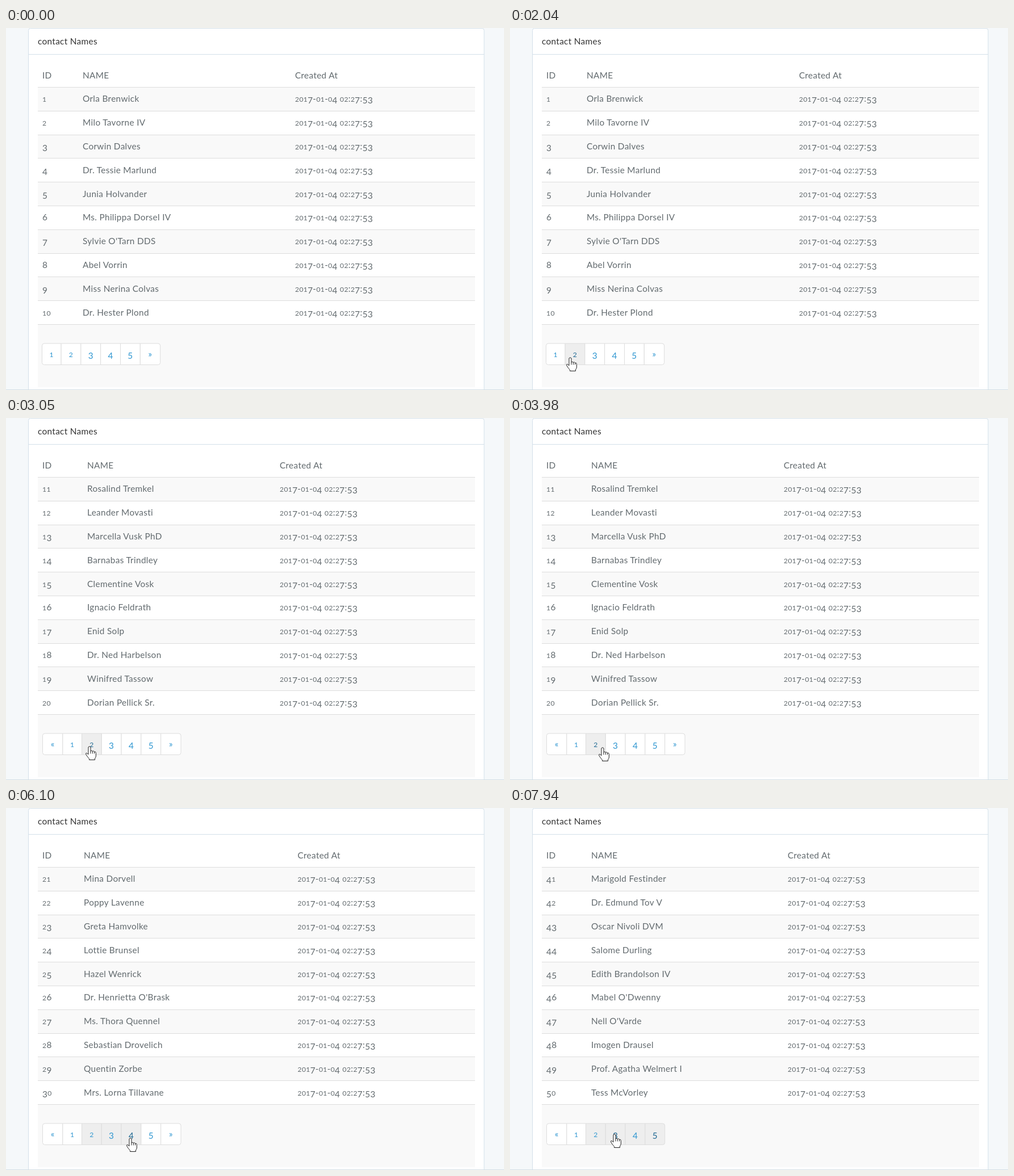
An HTML page for the animation above (8000 ms loop, 877 px wide and 638 px high).

```html
<!DOCTYPE html>
<html lang="en">
<head>
<meta charset="utf-8">
<title>Paged contact table</title>
<style>
  html, body { margin: 0; width: 100%; height: 100%; overflow: hidden; background: #f5f8fa; }
  svg { display: block; }
  text { font: 15.4px Lato, "Open Sans", sans-serif; letter-spacing: .3px; fill: #636b6f; white-space: pre; }
  .title { fill: #333; }
  .link text { fill: #3097d1; text-anchor: middle; }
  .link path { fill: #fff; stroke: #ddd; }
  .link.shaded path { fill: #eee; }
  .link.dark text { fill: #216a94; }
</style>
</head>
<body>
<svg id="stage" width="877" height="638" viewBox="0 0 877 638">
  <rect x="39.5" y=".5" width="802.5" height="660" rx="4" fill="#fff" stroke="#d3e0e9"/>
  <path d="M40 46.5H842" stroke="#d3e0e9"/>
  <text class="title" x="56" y="28.5">contact Names</text>
  <g id="pages"></g>
  <path d="M0 637.5H877" stroke="#d3dfe6"/>
  <g id="cursor" stroke="#222" stroke-linejoin="round" fill="#fff">
    <path id="arrow" d="M0 0V16.5L3.8 13L6.3 18.7L8.9 17.6L6.4 12H11.6Z"/>
    <path id="hand" d="M-2 1Q0-1.6 2 1V8Q4 6.400 5.400 8.300Q7.400 7 8.600 9.200Q11.400 8.500 11.400 11.500V17Q11 19.500 9.500 21V23.500H-.5V21.500Q-3 19-5.500 15Q-7.300 12.300-6 11.600Q-4.500 11-2 14ZM2 8V12.500M5.400 8.300V12.500M8.600 9.200V12.500"/>
  </g>
</svg>
<script>
const LOOP = 8000, CURSOR_START = 340, CURSOR_STEP = 77.5, ROW = 41.8;

const pages = [
  { start: 0, nameX: 135, dateX: 509, names: "Orla Brenwick,Milo Tavorne IV,Corwin Dalves,Dr. Tessie Marlund,Junia Holvander,Ms. Philippa Dorsel IV,Sylvie O'Tarn DDS,Abel Vorrin,Miss Nerina Colvas,Dr. Hester Plond" },
  { start: 2590, nameX: 143, dateX: 482, names: "Rosalind Tremkel,Leander Movasti,Marcella Vusk PhD,Barnabas Trindley,Clementine Vosk,Ignacio Feldrath,Enid Solp,Dr. Ned Harbelson,Winifred Tassow,Dorian Pellick Sr." },
  { start: 5080, nameX: 137, dateX: 513.5, names: "Mina Dorvell,Poppy Lavenne,Greta Hamvolke,Lottie Brunsel,Hazel Wenrick,Dr. Henrietta O'Brask,Ms. Thora Quennel,Sebastian Drovelich,Quentin Zorbe,Mrs. Lorna Tillavane" },
  { start: 6330, nameX: 135, dateX: 523, names: "Gwendolyn Heskam I,Tilda Rogavin V,Desmond Urkell,Mr. Colin Vard,Josephine Dulnek,Theodora Mivel,Rosemary Plunden DVM,Miss Petra Lommarino II,Ambrose Kellinder,Gilbert Hodvar MD" },
  { start: 7420, nameX: 143, dateX: 489, names: "Marigold Festinder,Dr. Edmund Tov V,Oscar Nivoli DVM,Salome Durling,Edith Brandolson IV,Mabel O'Dwenny,Nell O'Varde,Imogen Drausel,Prof. Agatha Welmert I,Tess McVorley" }
];

// Moment at which each page link is clicked.
const clicks = { 2: 2270, 3: 4850, 4: 6100, 5: 7180 };

// time, x, y of the pointer tip
const moves = [
  [340, 616, 613], [500, 490, 580], [660, 360, 537], [900, 150, 410], [1110, 40, 242],
  [1190, 40, 243], [1350, 85, 290], [1500, 110, 370], [1680, 122, 470], [1830, 122, 560],
  [1970, 107, 578], [2040, 106, 581], [2440, 107, 581], [2580, 107, 581], [3040, 147, 579],
  [3140, 149, 580], [3800, 149, 580], [4080, 171, 582], [4300, 187, 580], [5040, 187, 580],
  [5380, 219, 582], [6290, 219, 582], [6770, 243, 583], [7800, 243, 583], [7930, 184, 575]
];

const $ = id => document.getElementById(id);

// Old-style figures: 0-2 at x-height, 3-5, 7 and 9 below the baseline.
function figures(string) {
  let offset = 0;
  return [...string].map(c => {
    const drop = /[34579]/.test(c) ? 3 : 0, dy = drop - offset;
    offset = drop;
    return `<tspan dy="${dy}"${/[012]/.test(c) ? ' font-size="12.2" style="font-size:12.2px"' : ""}>${c}</tspan>`;
  }).join("");
}

const text = (x, y, content) => `<text x="${x}" y="${y}">${content}</text>`;

function buttonPath(l, r, first, last) {
  const a = first ? 4 : 0, b = last ? 4 : 0;
  return `M${l + a} 556H${r - b}q${b} 0 ${b} ${b}V${593.5 - b}q0 ${b} ${-b} ${b}H${l + a}q${-a} 0 ${-a} ${-a}V${556 + a}q0 ${-a} ${a} ${-a}Z`;
}

function pagerLinks(index) {
  const labels = [...(index ? "«" : ""), ..."12345", ...(index < 4 ? "»" : "")];
  let x = index ? 64.5 : 63.5;
  return labels.map((label, i) => {
    const width = label === "1" ? 33.6 : /\d/.test(label) ? 34.8 : 35.4;
    const link = { label, left: x, right: x += width };
    link.path = buttonPath(link.left, link.right, i === 0, i === labels.length - 1);
    return link;
  });
}

function pageMarkup(page, index) {
  let out = text(64, 88.5, "ID") + text(page.nameX, 88.5, "NAME") + text(page.dateX, 88.5, "Created At");
  page.names.split(",").forEach((name, i) => {
    const top = 104.5 + ROW * i, base = 130.3 + ROW * i;
    if (i % 2 === 0) out += `<rect x="56" y="${top}" width="770" height="${ROW}" fill="#f9f9f9"/>`;
    out += `<path d="M56 ${Math.floor(top) + .5}H826" stroke="#ddd"/>`
      + text(64, base, figures(String(index * 10 + i + 1)))
      + text(page.nameX, base, name)
      + text(page.dateX, base, figures("2017-01-04 02:27:53"));
  });
  out += `<rect x="56" y="522" width="770" height="111" fill="#f9f9f9"/><path d="M56 522.5H826" stroke="#ddd"/>`;
  for (const { label, left, right, path } of page.links)
    out += `<g class="link"><path d="${path}"/>${text((left + right) / 2, 580.3, figures(label))}</g>`;
  return `<g>${out}</g>`;
}

pages.forEach((page, i) => page.links = pagerLinks(i));
$("pages").innerHTML = pages.map(pageMarkup).join("");
pages.forEach((page, i) => {
  page.group = $("pages").children[i];
  page.group.querySelectorAll(".link").forEach((node, k) => page.links[k].node = node);
});

function pointerAt(t) {
  const next = moves.findIndex(m => m[0] > t);
  if (next < 0) return moves[moves.length - 1].slice(1);
  const [t0, x0, y0] = moves[Math.max(0, next - 1)], [t1, x1, y1] = moves[next];
  const k = Math.max(0, (t - t0) / (t1 - t0));
  return [x0 + (x1 - x0) * k, y0 + (y1 - y0) * k];
}

function draw(t) {
  const visible = t >= CURSOR_START;
  const step = Math.floor((t - CURSOR_START + 10) / CURSOR_STEP);
  const [x, y] = pointerAt(CURSOR_START + step * CURSOR_STEP).map(Math.round);
  const current = pages.filter(p => p.start <= t).pop();
  const focused = Object.keys(clicks).filter(n => clicks[n] <= t).pop();
  let overLink = false;

  pages.forEach(p => p.group.style.display = p === current ? "" : "none");
  for (const { label, left, right, node } of current.links) {
    const hover = visible && x >= left && x < right && y > 556 && y < 594;
    overLink ||= hover;
    node.classList.toggle("shaded", hover || clicks[label] <= t);
    node.classList.toggle("dark", hover || label === focused);
  }
  $("cursor").style.display = visible ? "" : "none";
  $("cursor").setAttribute("transform", `translate(${x} ${y})`);
  $("arrow").style.display = overLink ? "none" : "";
  $("hand").style.display = overLink ? "" : "none";
}

const origin = performance.now();
function tick() {
  draw((performance.now() - origin) % LOOP);
  requestAnimationFrame(tick);
}
draw(0);
requestAnimationFrame(tick);
</script>
</body>
</html>
```
